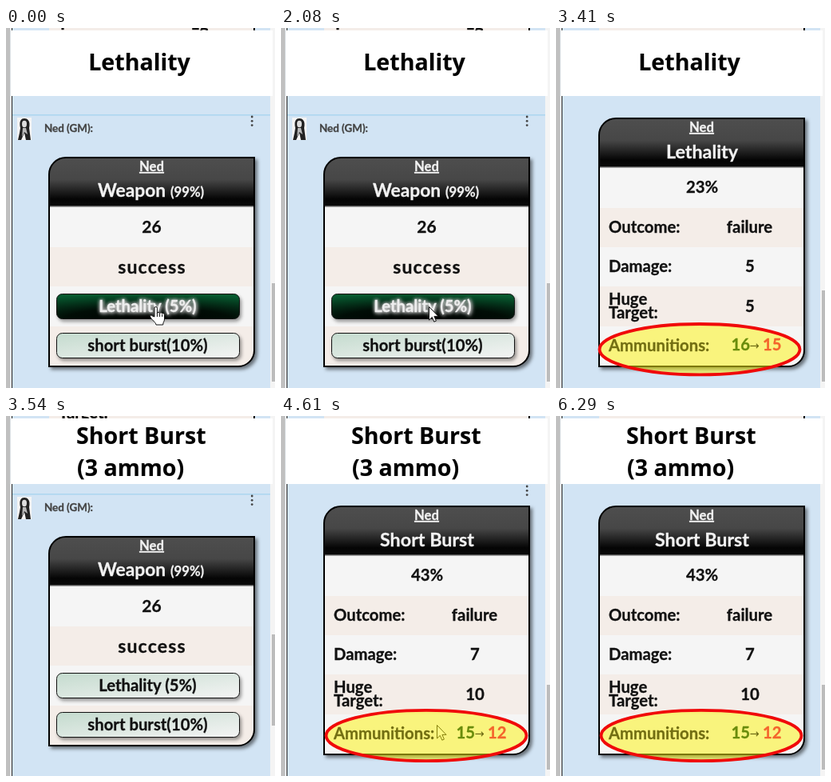
Recreate the animation shown at these times as an HTML page. Size 337 by 450 pixels, loop 6.85 s.

```html
<!DOCTYPE html>
<html lang="en">
<head>
<meta charset="utf-8">
<title>Lethality</title>
<style>
  html, body { margin: 0; width: 100%; height: 100%; overflow: hidden; background: #d2e4f4; }
  svg { display: block; width: 100vw; height: 100vh; }
  text {
    --ink: #111;
    font: 700 20.3px Lato, sans-serif; white-space: pre;
    fill: var(--ink); stroke: var(--ink); stroke-width: .3px;
  }
  .title { --ink: #000; font: 700 28.6px "Open Sans", "Noto Sans", sans-serif; stroke-width: .1px; }
  .head { --ink: #f2f2f2; font-size: 23.3px; }
  .small { --ink: #f2f2f2; font-size: 16.7px; }
  .card { filter: drop-shadow(3px 3px 2px rgba(0, 0, 0, .5)); }
  .button { filter: drop-shadow(2px 3px 2px rgba(0, 0, 0, .4)); }
  .glow { --ink: #eee; filter: drop-shadow(0 0 2px #ddd) drop-shadow(1px 1px 2px #999); }
</style>
</head>
<body>
<svg id="stage" viewBox="0 0 337 450" preserveAspectRatio="none">
  <defs>
    <linearGradient id="header" x2="0" y2="1">
      <stop offset="0" stop-color="#4e4e4e"/>
      <stop offset=".45" stop-color="#474747"/>
      <stop offset=".85" stop-color="#050505"/>
      <stop offset="1" stop-color="#0a0a0a"/>
    </linearGradient>
    <linearGradient id="pale" x2="1" y2="1">
      <stop offset="0" stop-color="#c4dbce"/>
      <stop offset="1" stop-color="#f4f4f4"/>
    </linearGradient>
    <radialGradient id="green" cx=".5" cy="1" r="1">
      <stop offset="0" stop-color="#000"/>
      <stop offset=".45" stop-color="#010d06"/>
      <stop offset="1" stop-color="#07592f"/>
    </radialGradient>
    <clipPath id="strip"><rect x="8" width="323" height="3.5"/></clipPath>
  </defs>
</svg>
<script>
const LOOP = 6850;
const NAME = 'Ned';
const ROWS = [174, 225, 274, 323, 373, 423];
const stage = document.getElementById('stage');

const text = (x, y, s, attrs = '') => `<text x="${x}" y="${y}" ${attrs}>${s}</text>`;
const mid = (x, y, s, attrs = '') => text(x, y, s, 'text-anchor="middle" ' + attrs);
const rect = (x, y, w, h, fill, attrs = '') =>
  `<rect x="${x}" y="${y}" width="${w}" height="${h}" fill="${fill}" ${attrs}/>`;

function add(markup) {
  const g = document.createElementNS('http://www.w3.org/2000/svg', 'g');
  g.innerHTML = markup;
  stage.appendChild(g);
  return g;
}

const show = (node, on) => node.setAttribute('display', on ? 'inline' : 'none');

function card(id, top, firstRow, heading) {
  const shape = `M54 ${top + 21}a21 21 0 0 1 21-21H311V403a20 20 0 0 1-20 20H54Z`;
  let rows = '';
  for (let i = firstRow; i < 5; i++) {
    const fill = (i - firstRow) % 2 ? '#f4ede8' : '#f5f5f5';
    rows += rect(53, ROWS[i], 259, ROWS[i + 1] - ROWS[i], fill);
  }
  return `<clipPath id="${id}"><path d="${shape}"/></clipPath>
    <g class="card"><g clip-path="url(#${id})">${rect(53, top, 259, 100, '#f5f5f5')}${rows}
    ${rect(53, top, 259, 61, 'url(#header)')}${rect(53, top + 60, 259, 1.5, '#555')}</g>
    <path d="${shape}" fill="none" stroke="#000" stroke-width="2"/></g>
    ${mid(182.5, top + 17, NAME, 'class="small" text-decoration="underline"')}${heading}`;
}

function button(y, label, lit) {
  return rect(63.5, y + .5, 229, 31, `url(#${lit ? 'green' : 'pale'})`,
      'rx="7" stroke="#111" class="button"') +
    mid(177.5, y + 23, label, `class="${lit ? 'glow' : ''}"`);
}

const dots = y => `<g fill="#444">${[0, 5.3, 10.6].map(d =>
  `<circle cx="308.2" cy="${y + d}" r="1.4"/>`).join('')}</g>`;

const avatar = `<g transform="translate(14 112)">${rect(0, 0, 18, 28, '#f4f4f4')}
  <path d="M4 13C2 4 5 1 9 1s8 3 6 12l2 15H11L9 19 5 28H1L3 19Z" fill="#222"/>
  <ellipse cx="9" cy="8" rx="3" ry="4.2" fill="#ddd"/>
  <path d="M7 13h4l2 8-4-3-3 6Z" fill="#bbb"/></g>`;

function weapon(id, lit) {
  const heading = text(115, 211, 'Weapon', 'class="head" style="font-size:22.8px"') +
    text(206, 211, '(99%)', 'class="small"');
  return rect(8, 108, 323, 1.5, '#acd6f0') + avatar +
    text(48, 130, `${NAME} (GM):`, 'style="font-size:13.4px;--ink:#444"') + dots(111) +
    card(id, 162, 1, heading) + mid(182.5, 256, '26', 'style="font-size:21px"') +
    mid(183, 307, 'success', 'style="font-size:23px;letter-spacing:1.2px"') +
    button(332, 'Lethality (5%)', lit === 0) + button(381, 'short burst(10%)', lit === 1);
}

function result(id, heading, roll, damage, huge) {
  return card(id, 113, 0, mid(183, 163, heading, 'class="head"')) +
    mid(183, 206, roll) + text(66, 256, 'Outcome:') + mid(242.5, 256, 'failure') +
    text(66, 305, 'Damage:') + mid(243, 305, damage) +
    text(66, 346, 'Huge') + text(66, 363, 'Target:') + mid(243, 355, huge);
}

function ammo(cx, cy, from, to) {
  return `<ellipse cx="${cx}" cy="${cy}" rx="125.5" ry="31.7" fill="#fdf200"
    fill-opacity=".49" stroke="#f00a0a" stroke-width="3.8"/>` +
    text(66, 404, 'Ammunitions:', 'style="--ink:#726e12"') +
    text(219.5, 403, from, 'style="--ink:#6a8c0c"') +
    text(242.5, 402, '→', 'style="font:14.5px DejaVu Sans,sans-serif;--ink:#6b6812;stroke:none"') +
    text(259, 403, to, 'style="--ink:#f4642c"');
}

// Backdrop and page edges
add(rect(0, 0, 337, 450, '#d2e4f4') + rect(0, 0, 5.5, 450, '#c0c0c0') +
  rect(5.5, 0, 1.5, 450, '#f4f4f4') + rect(7, 0, 1, 450, '#222') +
  rect(331, 0, 6, 450, '#f4f4f4'));
const thumb = add(rect(333, 0, 4, 1, '#bcbcbc')).firstChild;

const weaponA = add(weapon('clipA', 0));
const weaponB = add(`<g transform="translate(0 -11)">${weapon('clipB', 1)}</g>`);
const weaponIdle = add(`<g transform="translate(0 -11)">${weapon('clipC', -1)}</g>`);
const resultA = add(result('clipD', 'Lethality', '23%', 5, 5));
const resultB = add(result('clipE', 'Short Burst', '43%', 7, 10));
const menu = add(dots(88));

// Older message peeking out above the title
const peek = markup => add(`<g clip-path="url(#strip)">${markup}</g>`);
peek(rect(54, 0, 257, 4, '#f4ede8') + rect(310, 0, 2, 4, '#000'));
const peekA = peek(text(68, 2, 'I') + text(231, 2, '1g'));
const peekB = peek(text(66, 3, 'Target:'));

add(rect(6, 3, 328, 82, '#fff'));
const titleA = add(mid(167, 53, 'Lethality', 'class="title"'));
const titleB = add(text(88, 35, 'Short Burst', 'class="title"') +
  text(89, 75, '(3 ammo)', 'class="title"'));

const click = add('<circle r="12" fill="#ff0" fill-opacity=".47"/>');
const arrow = add(`<path d="M.5.5V17L4.3 13.4 6.8 19.2 9.4 18.1 6.9 12.4H12Z"
  fill="#fff" stroke="#111"/>`);
const hand = add(`<path d="M1 13V2.2a1.7 1.7 0 0 1 3.4 0V8.5c.3-1.5 3-1.5 3.2.2
  .4-1.3 3-1.2 3.1.5.5-1 2.8-.7 2.8 1.2V16c0 3-1.8 3.6-1.8 7H3C3 20-3.6 16-4.4 12.6
  c-.2-1.8 2-2 3.2-.4Z" fill="#fff" stroke="#111"/><path d="M4.4 8v5M7.6 9v4M10.7 10v3"
  stroke="#111" fill="none"/>`);
const ammoA = add(ammo(180, 401.7, 16, 15));
const ammoB = add(ammo(182, 399.5, 15, 12));

// Pointer leaves downwards in steps of 70 ms, speeding up.
function leave(t, start, steps, x, y, dx, dy) {
  const i = t < start ? 0 : Math.min(steps, Math.floor((t - start) / 70) + 1);
  const p = Math.pow(i / steps, 1.4);
  return { x: x + dx * p, y: y + dy * p, gone: i === steps };
}

function draw(t) {
  const within = (a, b) => t >= a && t < b;
  const first = t < 2410;
  const resA = within(2410, 3540);
  const second = within(3540, 4610);
  const resB = t >= 4610;

  show(weaponA, first);
  show(weaponIdle, within(3540, 3610));
  show(weaponB, within(3610, 4610));
  show(resultA, resA);
  show(resultB, resB);
  show(ammoA, resA);
  show(ammoB, resB);
  show(menu, within(2410, 3410) || within(4610, 6290));
  show(titleA, t < 3540);
  show(titleB, t >= 3540);
  show(peekA, first);
  show(peekB, second);

  const top = first ? 319 : resA ? 328 : second ? 273 : 336;
  thumb.setAttribute('y', top);
  thumb.setAttribute('height', second ? 114 : 442 - top);

  const pos = t < 3540 ? leave(t, 2670, 6, 185, 348, 96, 106)
                       : leave(t, 5540, 8, 195, 386, 94, 68);
  const place = `translate(${pos.x} ${pos.y})`;
  for (const node of [click, arrow, hand]) node.setAttribute('transform', place);
  const pointing = t < 2080 || within(3610, 4280);
  show(hand, pointing);
  show(arrow, !pointing && !pos.gone && !within(3410, 3610));
  show(click, within(1400, 1550) || within(3750, 4020));
}

function tick() {
  draw(performance.now() % LOOP);
  requestAnimationFrame(tick);
}
tick();
</script>
</body>
</html>
```
